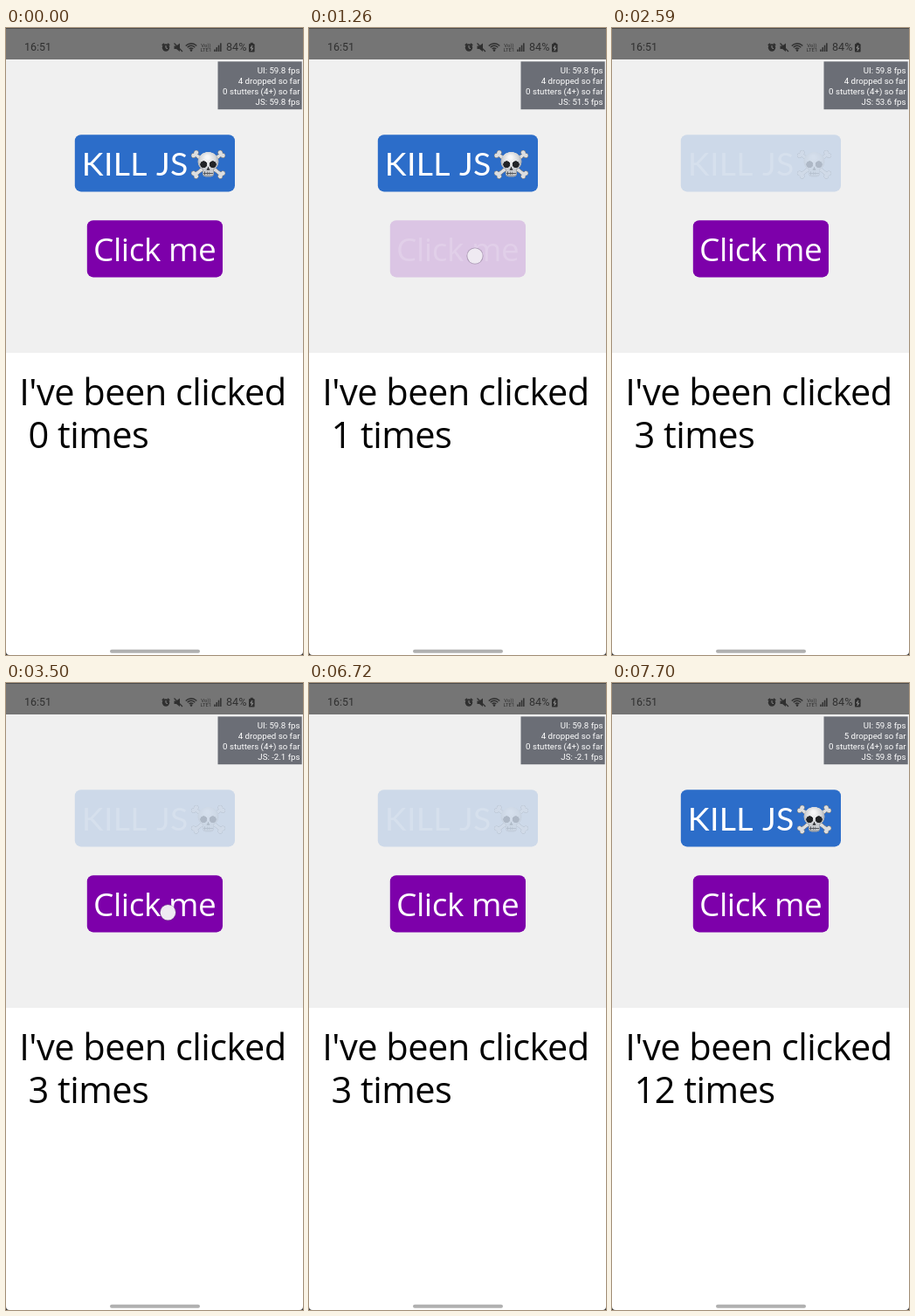
These frames come from a looping animation (340 px wide and 718 px high, 7770 ms). An HTML page with a canvas:

```html
<!DOCTYPE html>
<html lang="en">
<head>
<meta charset="utf-8">
<title>Button demo</title>
<style>
  html, body { margin: 0; width: 100%; height: 100%; overflow: hidden; background: #fff; }
  canvas { display: block; width: 340px; height: 718px; }
</style>
</head>
<body>
<canvas id="stage"></canvas>
<script>
const W = 340, H = 718, LOOP = 7770, STEP = 70;
const SMALL = 'Roboto, "Noto Sans", sans-serif';
const LARGE = '"Open Sans", "Noto Sans", sans-serif';
const CAPS = 'Lato, "Open Sans", sans-serif';
const BLUE = '#2c6dc9', PURPLE = '#7d00aa';
const DIM = 0.18, FADE = 250;

const dpr = Math.max(1, window.devicePixelRatio || 1);
const canvas = document.getElementById('stage');
canvas.width = W * dpr;
canvas.height = H * dpr;
const ctx = canvas.getContext('2d');

// Taps that get an answer: [down, up, x, y]
const taps = [
  [630, 840, 182, 262],
  [1190, 1330, 190, 261],
  [1680, 1820, 167, 259]
];
const killTap = [2170, 2380, 186, 162];
const RESUME = 6790;

// Taps made while the script thread is blocked
const blocked = Array.from({ length: 9 }, (_, i) => {
  const down = 2730 + i * 182;
  return [down, down + 105, 176 + 11 * Math.sin(i * 2.1), 261 + 2 * Math.cos(i * 1.7)];
});
const dots = [...taps, killTap, ...blocked];

// Readouts: [from, value]
const uiFps = [[0, '59.8'], [3710, '59.7'], [4830, '59.8'], [5250, '59.7'], [6300, '59.8']];
const jsFps = [[0, '59.8'], [1190, '51.5'], [1680, '53.6'], [2730, '22.7'],
  [3220, '-2.1'], [6790, '41.2'], [7280, '59.8']];
const dropped = [[0, 4], [6790, 5]];

const at = (list, t) => list.filter(([from]) => t >= from).pop()[1];
const clamp = v => Math.min(1, Math.max(0, v));
const ease = v => v < 0.5 ? 2 * v * v : 1 - 2 * (1 - v) * (1 - v);

// Dims at once on press, fades back after release
function pressAlpha(t, list) {
  let a = 1;
  for (const [down, up] of list) {
    if (t >= down) a = DIM + (1 - DIM) * ease(clamp((t - up) / FADE));
  }
  return a;
}

function clicks(t) {
  const direct = taps.filter(tap => t >= tap[1]).length;
  const queued = Math.floor((t - RESUME) / 70 * 4);
  return direct + Math.min(9, Math.max(0, queued));
}

function text(s, x, y, size, color, { font = SMALL, align = 'left', track = 0 } = {}) {
  ctx.font = `${size}px ${font}`;
  ctx.letterSpacing = `${track * size}px`;
  ctx.fillStyle = color;
  ctx.textAlign = align;
  ctx.fillText(s, x, y);
}

const largeText = (s, x, y, size, color) =>
  text(s, x, y, size, color, { font: LARGE, track: -0.012 });

function rounded(c, x, y, w, h, r, color) {
  c.fillStyle = color;
  c.beginPath();
  c.roundRect(x, y, w, h, r);
  c.fill();
}

function oval(c, x, y, rx, ry, color) {
  c.fillStyle = color;
  c.beginPath();
  c.ellipse(x, y, rx, ry, 0, 0, Math.PI * 2);
  c.fill();
}

const disc = (c, x, y, r, color) => oval(c, x, y, r, r, color);

function line(c, color, width, ...pts) {
  c.strokeStyle = color;
  c.lineWidth = width;
  c.beginPath();
  pts.forEach(([x, y], i) => i ? c.lineTo(x, y) : c.moveTo(x, y));
  c.stroke();
}

function makeSkull() {
  const k = 4, pic = document.createElement('canvas');
  pic.width = 44 * k;
  pic.height = 38 * k;
  const c = pic.getContext('2d');
  c.scale(k, k);
  c.translate(22, 19);
  c.lineCap = 'round';
  for (const [grow, color] of [[0.5, '#85898f'], [-0.2, '#dcdee0']]) {
    for (const s of [-1, 1]) {
      line(c, color, 3.6 + grow * 2, [-15 * s, -11.5], [15 * s, 12]);
      for (const e of [-1, 1]) {
        const x = 15 * s * e, y = e < 0 ? -11.5 : 12;
        disc(c, x + s * e * 1.8, y - e * 1.6, 2.5 + grow, color);
        disc(c, x - s * e * 1.2, y + e * 1.8, 2.5 + grow, color);
      }
    }
  }
  const shade = c.createRadialGradient(-1, -8, 2, 0, -3, 15);
  shade.addColorStop(0, '#f6f6f7');
  shade.addColorStop(0.55, '#d3d5d8');
  shade.addColorStop(1, '#83878c');
  rounded(c, -6.6, 0, 13.2, 14.5, 4, '#9da1a6');
  oval(c, 0, -3, 12, 11, shade);
  rounded(c, -5.8, 4, 11.6, 8.5, 2, '#c9ccd0');
  for (const s of [-1, 1]) oval(c, 5.2 * s, 0.2, 4, 3.9, '#222427');
  c.fillStyle = '#303236';
  c.beginPath();
  c.moveTo(0, 3);
  c.lineTo(2, 6.6);
  c.lineTo(-2, 6.6);
  c.fill();
  for (let x = -4; x <= 4; x += 2.7) line(c, '#55585d', 0.8, [x, 8.8], [x, 12]);
  line(c, '#55585d', 0.9, [-5, 10.5], [5, 10.5]);
  return pic;
}
const skull = makeSkull();

function statusBar() {
  const ink = '#303030';
  ctx.fillStyle = '#757575';
  ctx.fillRect(0, 0, W, 36);
  ctx.fillStyle = '#4c4c4c';
  ctx.fillRect(0, 0, W, 1);
  text('16:51', 21, 26, 12.4, ink);

  // alarm
  disc(ctx, 183, 22.5, 4.2, ink);
  line(ctx, ink, 1.6, [178.8, 19.8], [181, 17.8]);
  line(ctx, ink, 1.6, [187.2, 19.8], [185, 17.8]);
  line(ctx, '#858585', 1, [183, 20], [183, 22.8], [185, 23.6]);

  // muted speaker
  ctx.fillStyle = ink;
  ctx.beginPath();
  [[192.5, 20.5], [195, 20.5], [199, 17.5], [199, 27], [195, 24], [192.5, 24]]
    .forEach(p => ctx.lineTo(...p));
  ctx.fill();
  line(ctx, ink, 1.2, [192.5, 17.5], [202, 27]);

  // wifi
  ctx.strokeStyle = ink;
  ctx.lineWidth = 1.4;
  for (const r of [3, 5.7, 8.3]) {
    ctx.beginPath();
    ctx.arc(212, 26, r, -Math.PI * 0.77, -Math.PI * 0.23);
    ctx.stroke();
  }
  disc(ctx, 212, 25.6, 1.3, ink);

  text('Vo))', 229, 21.5, 6, ink, { align: 'center' });
  text('LTE1', 229, 27, 6, ink, { align: 'center' });
  for (let i = 0; i < 4; i++) ctx.fillRect(238.2 + i * 2.3, 24.5 - i * 2.4, 1.5, 2.5 + i * 2.4);
  text('84%', 252, 26, 12.6, ink);

  // battery
  rounded(ctx, 278, 18, 6.6, 9.6, 1.2, ink);
  ctx.fillRect(279.8, 16.8, 3, 1.6);
  line(ctx, '#a0a0a0', 1, [282, 20], [280, 23], [282.6, 23], [280.8, 26]);
}

function monitor(t) {
  ctx.fillStyle = '#6b6e76';
  ctx.fillRect(242.5, 38.4, 96.2, 54.8);
  [
    `UI: ${at(uiFps, t)} fps`,
    `${at(dropped, t)} dropped so far`,
    '0 stutters (4+) so far',
    `JS: ${at(jsFps, t)} fps`
  ].forEach((s, i) => text(s, 336.5, 51.7 + i * 12, 9.7, '#fff', { align: 'right' }));
}

function buttons(t) {
  ctx.globalAlpha = pressAlpha(t, [[killTap[0], RESUME]]);
  rounded(ctx, 78.8, 122.2, 183.2, 65.2, 7, BLUE);
  text('KILL JS', 86.8, 168.7, 37.4, '#fff', { font: CAPS, track: 0.01 });
  ctx.drawImage(skull, 209.5, 137, 44, 38);

  ctx.globalAlpha = pressAlpha(t, [...taps, [6860, 7000]]);
  rounded(ctx, 92.8, 220.2, 155.2, 65.2, 7, PURPLE);
  largeText('Click me', 100, 267.3, 37, '#fff');
  ctx.globalAlpha = 1;
}

function touch(t) {
  for (const [down, up, x, y] of dots) {
    if (t < down || t >= up) continue;
    disc(ctx, x, y, 9.6, 'rgba(120,105,130,0.5)');
    disc(ctx, x, y, 8.7, '#efeaf2');
  }
}

function draw(t) {
  ctx.setTransform(dpr, 0, 0, dpr, 0, 0);
  ctx.fillStyle = '#fff';
  ctx.fillRect(0, 0, W, H);
  ctx.fillStyle = '#f0f0f0';
  ctx.fillRect(0, 36, W, 336);
  statusBar();
  buttons(t);
  monitor(t);
  largeText("I've been clicked", 15.2, 432.3, 41.5, '#000');
  largeText(` ${clicks(t)} times`, 15.2, 481.4, 41.5, '#000');
  rounded(ctx, 119, 711.8, 103, 4, 2, '#b0b0b0');

  // rounded screen corners
  ctx.fillStyle = '#333';
  for (const x of [0, W]) {
    ctx.beginPath();
    ctx.moveTo(x, H);
    ctx.lineTo(x, H - 4);
    ctx.quadraticCurveTo(x, H, x ? x - 4 : 4, H);
    ctx.fill();
  }
  touch(t);
}

const start = performance.now();
function frame() {
  const t = (performance.now() - start) % LOOP;
  draw(Math.floor(t / STEP) * STEP);
  requestAnimationFrame(frame);
}
frame();
</script>
</body>
</html>
```
